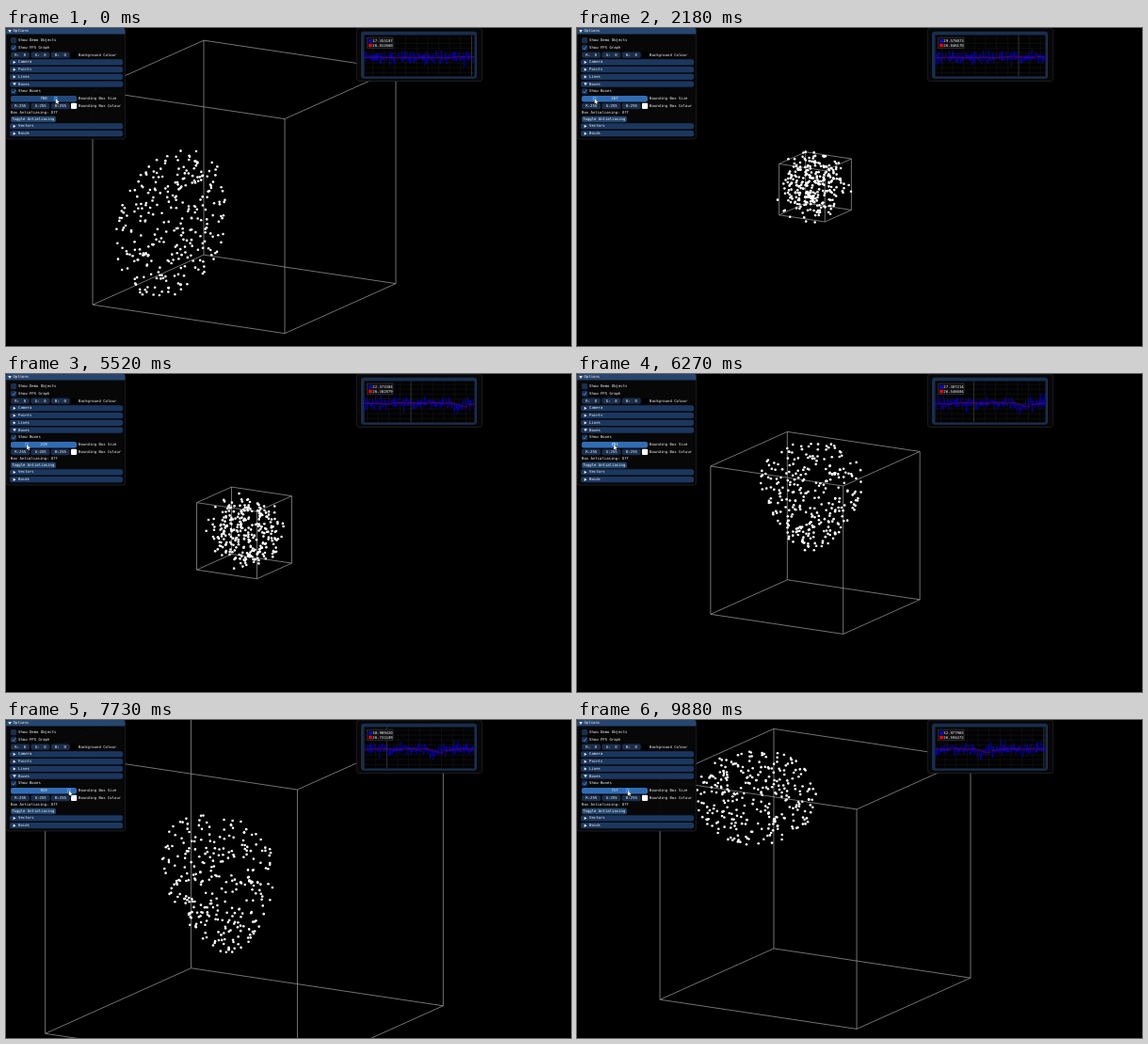
These frames come from a looping animation (600x338 px, 9910 ms). An HTML page with a canvas:

```html
<!DOCTYPE html>
<html lang="en">
<head>
<meta charset="utf-8">
<style>
html, body { margin: 0; width: 600px; height: 338px; overflow: hidden; background: #000; }
canvas { display: block; }
</style>
</head>
<body>
<canvas id="stage" width="600" height="338"></canvas>
<script>
const ctx = document.getElementById('stage').getContext('2d');
const LOOP = 9910, SAMPLE = 100 / 3, BOIDS = 290, CLUMPS = 13;
const BLUE = '#4296fa', HEADER = '#1b375f', FRAME = '#1a2e4c', PANEL = 'rgba(8,8,9,.96)';

const hash = n => {
  const v = Math.sin(n * 127.1 + 11.7) * 43758.5453;
  return v - Math.floor(v);
};
const mix = (a, b, u) => a + (b - a) * u;
const clamp = (v, low, high) => Math.max(low, Math.min(high, v));

// Linear interpolation between rows of [time, ...values].
function track(keys, t) {
  let i = 0;
  while (i < keys.length - 2 && t >= keys[i + 1][0]) i++;
  const [a, b] = [keys[i], keys[i + 1]];
  const u = clamp((t - a[0]) / (b[0] - a[0]), 0, 1);
  return a.slice(1).map((v, k) => mix(v, b[k + 1], u));
}

// The slider drag runs past the slider's end, where the size is clamped.
const DRAG = [[0, 700], [450, 700], [2180, 167], [4000, 13], [4180, 13],
  [5520, 219], [6910, 708], [8670, 1160], [9880, 717]];

// Flock outline: time, centre x and y, half width and height, lean, taper.
const FLOCK = [
  [0, 176, 208, 58, 80, -14, 0],
  [2180, 249, 169, 47, 45, 0, 0],
  [4180, 259, 166, 23, 17, 0, 0],
  [5520, 254, 167, 46, 46, 0, 0],
  [6910, 245, 99, 56, 70, 0, 0.65],
  [8670, 206, 261, 60, 80, 20, 0],
  [9880, 190, 82, 65, 51, 0, 0]
];

function rect(x, y, w, h, fill, radius = 0, stroke) {
  ctx.beginPath();
  ctx.roundRect(x, y, w, h, radius);
  ctx.fillStyle = fill;
  ctx.fill();
  if (stroke) {
    ctx.strokeStyle = stroke;
    ctx.lineWidth = 0.7;
    ctx.stroke();
  }
}

function strokePath(points, color, width) {
  ctx.beginPath();
  points.forEach(([x, y]) => ctx.lineTo(x, y));
  ctx.strokeStyle = color;
  ctx.lineWidth = width;
  ctx.stroke();
}

function fillPath(points, fill) {
  ctx.beginPath();
  points.forEach(([x, y]) => ctx.lineTo(x, y));
  ctx.fillStyle = fill;
  ctx.fill();
}

function text(str, x, y, align = 'left') {
  ctx.save();
  ctx.translate(x, y);
  ctx.scale(0.25, 0.25);
  ctx.font = '15.8px "DejaVu Sans Mono", monospace';
  ctx.textRendering = 'geometricPrecision';
  ctx.textAlign = align;
  ctx.textBaseline = 'middle';
  ctx.fillStyle = '#f4f4f4';
  ctx.fillText(str, 0, 0);
  ctx.restore();
}

function drawBox(size) {
  const k = size / 700;
  const corner = (a, b, c) => [253 + k * (102 * a - 59 * b), 168.9 + k * (15.25 * a + 26.5 * b + 114 * c)];
  const edge = (p, q) => strokePath([corner(...p), corner(...q)], '#989898', 0.75);
  for (const a of [-1, 1]) for (const b of [-1, 1]) {
    edge([-1, a, b], [1, a, b]);
    edge([a, -1, b], [a, 1, b]);
    edge([a, b, -1], [a, b, 1]);
  }
}

// A seeded point of the unit disc that slowly orbits its centre.
function discPoint(seed, turn) {
  const angle = hash(seed) * Math.PI * 2 + turn;
  const radius = Math.sqrt(hash(seed + 0.37));
  return [Math.cos(angle) * radius, Math.sin(angle) * radius];
}

function drawBoids(t, size) {
  const [x, y, width, height, lean, taper] = track(FLOCK, t);
  const spread = Math.min(1, 0.06 + size / 320);
  const turn = t * 0.0005;
  ctx.fillStyle = '#fff';
  for (let i = 0; i < BOIDS; i++) {
    const own = discPoint(i * 3 + 1, turn);
    const clump = discPoint(i % CLUMPS * 7 + 2000, turn);
    const u = mix(clump[0], own[0], spread), v = mix(clump[1], own[1], spread);
    ctx.beginPath();
    ctx.arc(x + u * width * (1 - taper * v) + lean * v, y + v * height, 1.3, 0, Math.PI * 2);
    ctx.fill();
  }
}

function arrow(x, y, open) {
  fillPath(open ? [[x - 1.8, y - 1.3], [x + 1.8, y - 1.3], [x, y + 1.6]]
    : [[x - 1.3, y - 1.7], [x + 1.5, y], [x - 1.3, y + 1.7]], '#f4f4f4');
}

function header(label, y, open) {
  rect(4, y - 3.1, 120, 6.2, HEADER, 2);
  arrow(9, y, open);
  text(label, 13, y);
}

function checkbox(label, y, on) {
  rect(5, y - 3.1, 6.2, 6.2, FRAME, 1.5);
  if (on) strokePath([[6.4, y], [7.8, y + 1.6], [10.2, y - 1.6]], BLUE, 0.9);
  text(label, 13, y);
}

function colourRow(label, y, value, swatch) {
  ['R', 'G', 'B'].forEach((name, i) => {
    const x = 5 + i * 21.4;
    rect(x, y - 3.2, 20, 6.4, FRAME, 2);
    text(name + ':' + value, x + 10.2, y, 'center');
  });
  rect(69, y - 3.1, 6.2, 6.2, swatch, 1);
  text(label, 77, y);
}

function drawOptions(size, active) {
  const row = n => 13.1 + n * 7.76;
  rect(0, 0, 126.4, 118, PANEL, 2, '#26262c');
  rect(0, 0, 126.4, 6.6, '#27466f', [2, 2, 0, 0]);
  arrow(4, 3.3, true);
  text('Options', 7.5, 3.4);

  checkbox('Show Demo Objects', row(0), false);
  checkbox('Show FPS Graph', row(1), true);
  colourRow('Background Colour', row(2), '  0', '#000');
  ['Camera', 'Points', 'Lines', 'Boxes'].forEach((label, i) => header(label, row(3 + i), label === 'Boxes'));
  checkbox('Show Boxes', row(7), true);

  rect(5, 72, 70, 6.5, active ? '#316db3' : '#234a7c', 2);
  rect(6 + 0.064 * size, 72.7, 4, 5.1, active ? BLUE : '#3d85e0', 1);
  text(String(Math.round(size)), 40, row(8), 'center');
  text('Bounding Box Size', 77, row(8));

  colourRow('Bounding Box Colour', row(9), '255', '#fff');
  text('Box Antialiasing: Off', 5, 90);
  rect(5, 93.7, 48, 6.5, '#23456d', 2);
  text('Toggle Antialiasing', 6.2, 97);
  header('Vectors', 104.4);
  header('Boids', 112.2);
}

// Noisy frame rate with one slow spell about four seconds in.
function fps(n) {
  const dip = 6 * Math.exp(-(((n - 124) / 18) ** 2));
  return 26 - dip + (hash(n + 900) - 0.46) * (13 + 24 * hash(n * 1.7 + 300) ** 4);
}

function averageFps(n, count = 30) {
  let sum = 0;
  for (let i = 0; i < count; i++) sum += fps(n - i);
  return sum / count;
}

function drawGraph(t) {
  const rate = 11.65, now = t / 1000, frame = Math.floor(t / SAMPLE);
  rect(372.3, 0, 133.4, 56.5, PANEL, 3, '#26262c');
  rect(377, 3.8, 123, 50, FRAME, 3);
  rect(380.5, 7.5, 117, 44, '#020203');

  ctx.save();
  ctx.beginPath();
  ctx.rect(380.5, 7.5, 117, 44);
  ctx.clip();
  for (let s = -10; s <= 10; s++) {
    const x = 494.4 + (s - now) * rate;
    strokePath([[x, 7.5], [x, 51.5]], `rgba(255,255,255,${s % 10 ? 0.08 : 0.32})`, 0.6);
  }
  for (let y = 11; y < 51; y += 5.2) strokePath([[380, y], [498, y]], 'rgba(255,255,255,.08)', 0.6);

  const plot = value => Array.from({ length: 305 }, (_, i) =>
    [497 - i * SAMPLE / 1000 * rate, 32 - (value(frame - i) - 25.5) * 0.6]);
  strokePath(plot(fps), 'rgba(0,0,255,.75)', 0.55);
  strokePath(plot(n => averageFps(n)), 'rgba(215,0,30,.7)', 0.6);
  ctx.restore();

  rect(383.5, 10, 27.5, 11.6, 'rgba(18,18,20,.92)', 0, '#34343c');
  [['#00f', fps(frame)], ['#f00', averageFps(frame, 300)]].forEach(([color, value], i) => {
    const y = 14 + i * 4.6;
    rect(385.2, y - 1.8, 3.4, 3.4, color);
    text(value.toFixed(6), 389.3, y);
  });
}

function drawCursor(x, y) {
  const outline = [[0, 0], [0, 5.6], [1.3, 4.5], [2.2, 6.4], [3, 6], [2.2, 4.2], [3.9, 4.1], [0, 0]]
    .map(([dx, dy]) => [x + dx, y + dy]);
  strokePath(outline, '#111', 0.8);
  fillPath(outline, '#fff');
}

function draw() {
  const t = performance.now() % LOOP;
  const [drag] = track(DRAG, t);
  const size = Math.min(1000, drag);
  ctx.fillStyle = '#000';
  ctx.fillRect(0, 0, 600, 338);
  drawBox(size);
  drawBoids(t, size);
  drawOptions(size, t >= SAMPLE);
  drawGraph(t);
  drawCursor(8 + 0.064 * drag, 74.8);
  requestAnimationFrame(draw);
}
draw();
</script>
</body>
</html>
```
